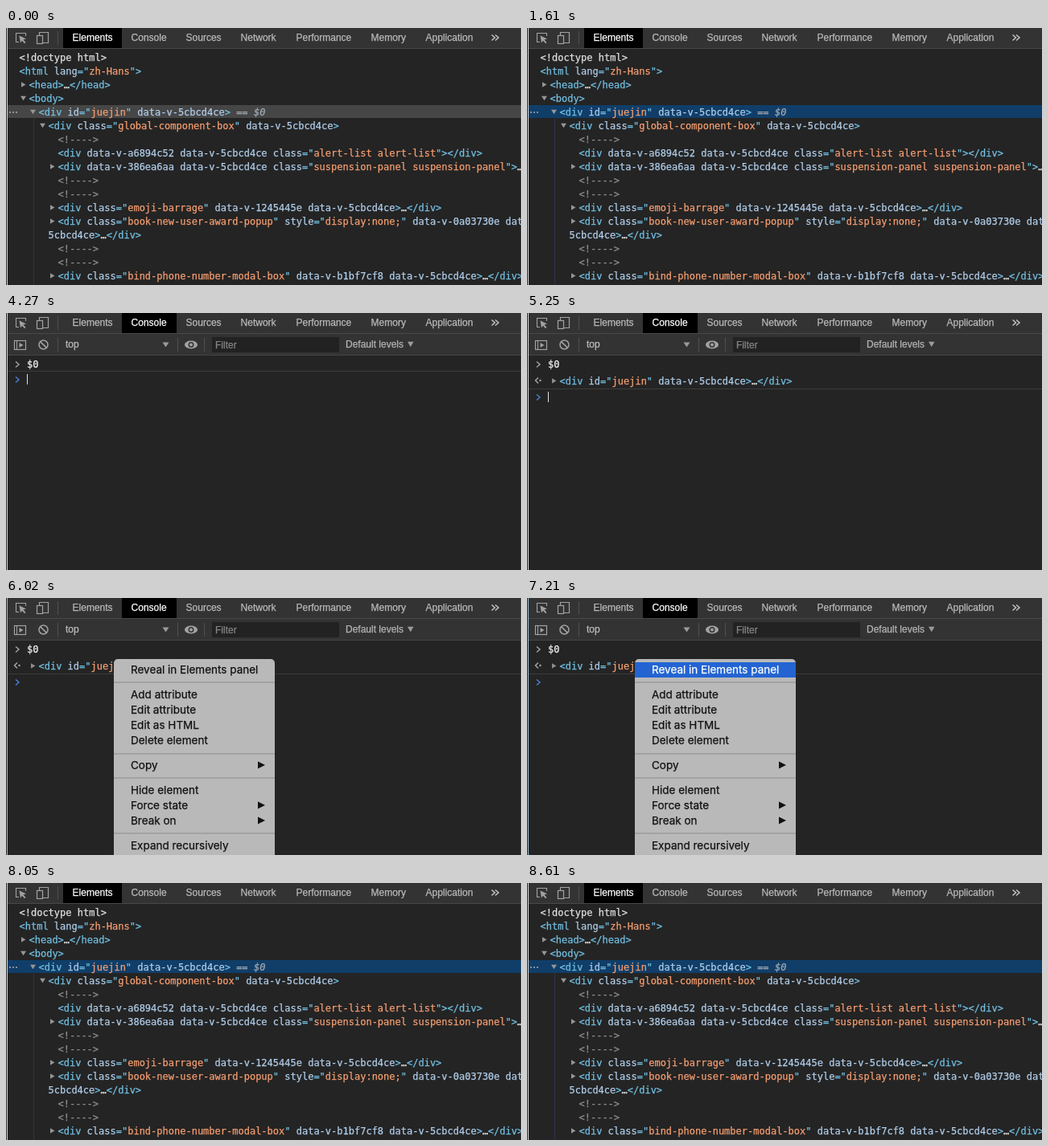
Write an HTML page with a canvas that moves like this. It is 640x320 px and loops after 8.68 s.

```html
<!DOCTYPE html>
<html lang="en">
<head>
<meta charset="utf-8">
<title>DevTools: $0 in the console</title>
<style>
html, body { margin: 0; width: 100%; height: 100%; overflow: hidden; background: #242424; }
canvas { display: block; width: 640px; height: 320px; }
</style>
</head>
<body>
<canvas id="stage" width="640" height="320"></canvas>
<script>
const ctx = document.getElementById('stage').getContext('2d');
const LOOP = 8680;
const UI = '12px "Liberation Sans", Arial, sans-serif';
const MONO = '12px "DejaVu Sans Mono", Menlo, monospace';
const MENU = '13.5px Inter, sans-serif';
const COLOR = {
  bg: '#242424', bar: '#333333', line: '#484848', icon: '#a2a2a2', arrow: '#969696',
  tag: '#72bfe2', attr: '#b0cdea', value: '#f49d70', text: '#e0e0e0', comment: '#8c8c8c'
};

// Times of the hard changes, in ms
const T = {
  focus: 1050, console: 1680, dollar: 2940, zero: 3500, enter: 4060, result: 4340,
  menu: 5880, hover: 6440, fade: 7280, closed: 7500, elements: 7630
};

const tabs = [
  ['Elements', 82], ['Console', 155], ['Sources', 223], ['Network', 291],
  ['Performance', 360], ['Memory', 453], ['Application', 521]
];

// x, arrow (r: closed, d: open), markup
const rows = [
  [16, '', '<!doctype html>'],
  [16, '', '<html lang="zh-Hans">'],
  [28, 'r', '<head>…</head>'],
  [28, 'd', '<body>'],
  [40, 'd', '<div id="juejin" data-v-5cbcd4ce>'],
  [52, 'd', '<div class="global-component-box" data-v-5cbcd4ce>'],
  [64, '', '<!---->'],
  [64, '', '<div data-v-a6894c52 data-v-5cbcd4ce class="alert-list alert-list"></div>'],
  [64, 'r', '<div data-v-386ea6aa data-v-5cbcd4ce class="suspension-panel suspension-panel">…</div>'],
  [64, '', '<!---->'],
  [64, '', '<!---->'],
  [64, 'r', '<div class="emoji-barrage" data-v-1245445e data-v-5cbcd4ce>…</div>'],
  [64, 'r', '<div class="book-new-user-award-popup" style="display:none;" data-v-0a03730e data-v-'],
  [52, '', '5cbcd4ce>…</div>'],
  [64, '', '<!---->'],
  [64, '', '<!---->'],
  [64, 'r', '<div class="bind-phone-number-modal-box" data-v-b1bf7cf8 data-v-5cbcd4ce>…</div>']
];

// label, centre y, has submenu
const menuItems = [
  ['Reveal in Elements panel', 89], ['Add attribute', 120], ['Edit attribute', 139],
  ['Edit as HTML', 158], ['Delete element', 177], ['Copy', 208, true],
  ['Hide element', 239], ['Force state', 258, true], ['Break on', 277, true],
  ['Expand recursively', 308]
];

function rect(x, y, w, h, color) {
  ctx.fillStyle = color;
  ctx.fillRect(x, y, w, h);
}

// A hairline outline gives the text its slightly heavier weight.
function text(s, x, y, color, font = UI) {
  ctx.font = font;
  ctx.fillStyle = ctx.strokeStyle = color;
  ctx.lineWidth = 0.25;
  ctx.fillText(s, x, y);
  ctx.strokeText(s, x, y);
  return x + ctx.measureText(s).width;
}

function path(points, color, width = 0) {
  ctx.beginPath();
  points.forEach(([x, y]) => ctx.lineTo(x, y));
  if (width) {
    ctx.strokeStyle = color;
    ctx.lineWidth = width;
    ctx.stroke();
  } else {
    ctx.fillStyle = color;
    ctx.fill();
  }
}

function circle(x, y, r, color, width = 0) {
  ctx.beginPath();
  ctx.arc(x, y, r, 0, Math.PI * 2);
  ctx.fillStyle = ctx.strokeStyle = color;
  ctx.lineWidth = width;
  width ? ctx.stroke() : ctx.fill();
}

function frame(x, y, w, h, color = COLOR.icon) {
  ctx.strokeStyle = color;
  ctx.lineWidth = 1.2;
  ctx.strokeRect(x, y, w, h);
}

const arrowRight = (x, y, w, h, color) => path([[x, y - h / 2], [x + w, y], [x, y + h / 2]], color);
const arrowDown = (x, y, w, h, color) => path([[x, y - h / 2], [x + w, y - h / 2], [x + w / 2, y + h / 2]], color);
const chevron = (x, y, color) => path([[x, y - 3.5], [x + 4, y], [x, y + 3.5]], color, 1.5);

function markup(source, x, y) {
  const put = (s, color) => { x = text(s, x, y, color, MONO); };
  for (const part of source.match(/<!.*|<\/?\w+|="[^"]*"|>|…|[^<>="…]+/g)) {
    if (part.startsWith('<!')) put(part, part[2] === '-' ? COLOR.comment : COLOR.text);
    else if (part.startsWith('=')) {
      put('="', COLOR.tag);
      put(part.slice(2, -1), COLOR.value);
      put('"', COLOR.tag);
    }
    else if (/[<>]/.test(part)) put(part, COLOR.tag);
    else put(part, part === '…' ? COLOR.text : COLOR.attr);
  }
  return x;
}

function drawTabs(active) {
  rect(0, 0, 640, 25, COLOR.bar);
  rect(0, 25, 640, 1, COLOR.line);
  if (active === 'Elements') rect(71, 0, 73, 25, '#000');
  else rect(144, 0, 68, 25, '#000');
  for (const [name, x] of tabs) text(name, x + 0.6, 16, name === active ? '#fff' : '#bababa');

  path([[16, 17.5], [12.5, 17.5], [12.5, 6.5], [24.5, 6.5], [24.5, 10]], COLOR.icon, 1.1);
  path([[16.5, 9.5], [25, 13.5], [21.5, 14.5], [24.5, 18], [23, 19.3], [20, 15.8], [18, 18.5]], COLOR.icon);
  path([[41.5, 9], [41.5, 5.5], [52.5, 5.5], [52.5, 18.5], [46, 18.5]], COLOR.icon, 1.2);
  frame(38.5, 9.5, 7, 10);
  rect(64, 4, 1, 17, '#505050');
  chevron(603.5, 12, '#c4c4c4');
  chevron(608, 12, '#c4c4c4');
}

function drawElements(focused) {
  rect(2, 96, 638, 16, focused ? '#103e69' : '#464646');
  rect(34, 113, 1, 207, '#30304f');
  rows.forEach(([x, arrow, source], i) => {
    const y = 41 + i * 17;
    if (arrow === 'r') arrowRight(x - 9, y - 4.5, 5.5, 6.5, COLOR.arrow);
    if (arrow === 'd') arrowDown(x - 10, y - 4.5, 7, 5.5, COLOR.arrow);
    const end = markup(source, x + 0.5, y);
    if (i === 4) {
      text(' == ', end, y, '#a0a8b0', MONO);
      text('$0', 308, y, '#a0a8b0', 'italic ' + MONO);
      for (const dot of [5, 9, 13]) circle(dot, y - 4, 1, '#a8adb2');
    }
  });
}

function drawConsoleBar() {
  rect(0, 26, 640, 26, COLOR.bar);
  rect(0, 52, 640, 1, '#454545');
  frame(10.5, 34.5, 14, 11);
  rect(13, 35, 1, 10, COLOR.icon);
  arrowRight(16.5, 40, 5, 6, COLOR.icon);
  circle(46.5, 39.5, 5.5, COLOR.icon, 1.5);
  path([[42.6, 35.6], [50.4, 43.4]], COLOR.icon, 1.5);
  for (const x of [64, 213, 246]) rect(x, 31, 1, 17, '#505050');
  text('top', 74, 43, '#bdbdbd');
  arrowDown(194.5, 39.5, 8, 6, '#9b9b9b');

  ctx.beginPath();
  ctx.ellipse(230, 39.5, 8, 5, 0, 0, Math.PI * 2);
  ctx.fillStyle = COLOR.icon;
  ctx.fill();
  circle(230, 39.5, 3.5, COLOR.bar);
  circle(230, 39.5, 2, COLOR.icon);

  rect(256, 30, 158, 19, '#222');
  text('Filter', 260, 44, '#858585');
  text('Default levels', 422, 43, '#b4b4b4');
  arrowDown(499, 39, 7.5, 6.5, '#9b9b9b');
}

function caretVisible(t) {
  if (t >= T.menu) return false;
  const blinkStart = t < T.dollar ? 1750 : t < T.zero ? T.dollar : t < T.enter ? T.zero : T.enter;
  return (t - blinkStart) % 1000 < 540;
}

function drawConsole(t) {
  drawConsoleBar();
  const entered = t >= T.enter;
  const resulted = t >= T.result;
  const promptY = resulted ? 105 : entered ? 83 : 63;
  const typed = t >= T.zero ? '$0' : t >= T.dollar ? '$' : '';

  if (typed) text(typed, 26, 68, '#f0f0f0', MONO);
  if (entered) {
    chevron(12, 64, '#a0a0a0');
    rect(2, resulted ? 94 : 72, 638, 1, '#3b3b3b');
  }
  if (resulted) {
    path([[14, 80.5], [10.5, 84], [14, 87.5]], '#a8a8a8', 1.4);
    circle(16.5, 84, 1.2, '#a8a8a8');
    arrowRight(31, 84.5, 5.5, 6.5, '#8c8c8c');
    markup('<div id="juejin" data-v-5cbcd4ce>…</div>', 40.5, 89);
  }
  chevron(12, promptY, '#4c7fd0');
  if (caretVisible(t)) {
    rect(entered ? 26 : 26 + Math.round(typed.length * 7.22), promptY - 7, 1, 13, '#e0e0e0');
  }
}

function drawMenu(t) {
  ctx.save();
  ctx.globalAlpha = Math.min(1, Math.max(0, (T.closed - t) / (T.closed - T.fade)));
  ctx.beginPath();
  ctx.roundRect(134, 76, 200, 260, 5);
  ctx.fillStyle = '#b9b9b9';
  ctx.fill();
  for (const y of [104, 193, 223, 292]) rect(134, y, 200, 2, '#a2a2a2');
  const hovered = t >= T.hover;
  if (hovered) rect(134, 80, 200, 19, '#2364d2');
  menuItems.forEach(([label, y, submenu], i) => {
    text(label, 155, y + 5, hovered && i === 0 ? '#fff' : '#111', MENU);
    if (submenu) arrowRight(313, y, 9, 9, '#111');
  });
  ctx.restore();
}

function draw(t) {
  const inConsole = t >= T.console && t < T.elements;
  rect(0, 0, 640, 320, COLOR.bg);
  drawTabs(inConsole ? 'Console' : 'Elements');
  if (inConsole) {
    drawConsole(t);
    if (t >= T.menu && t < T.closed) drawMenu(t);
  } else {
    drawElements(t >= T.focus);
  }
  // Edge of the inspected page
  rect(0, 0, 1, 320, COLOR.bg);
  rect(1, 0, 1, 320, inConsole && t >= 5390 ? '#9fbdd2' : '#d8d8d8');
}

const start = performance.now();
function tick() {
  draw((performance.now() - start) % LOOP);
  requestAnimationFrame(tick);
}
tick();
</script>
</body>
</html>
```
